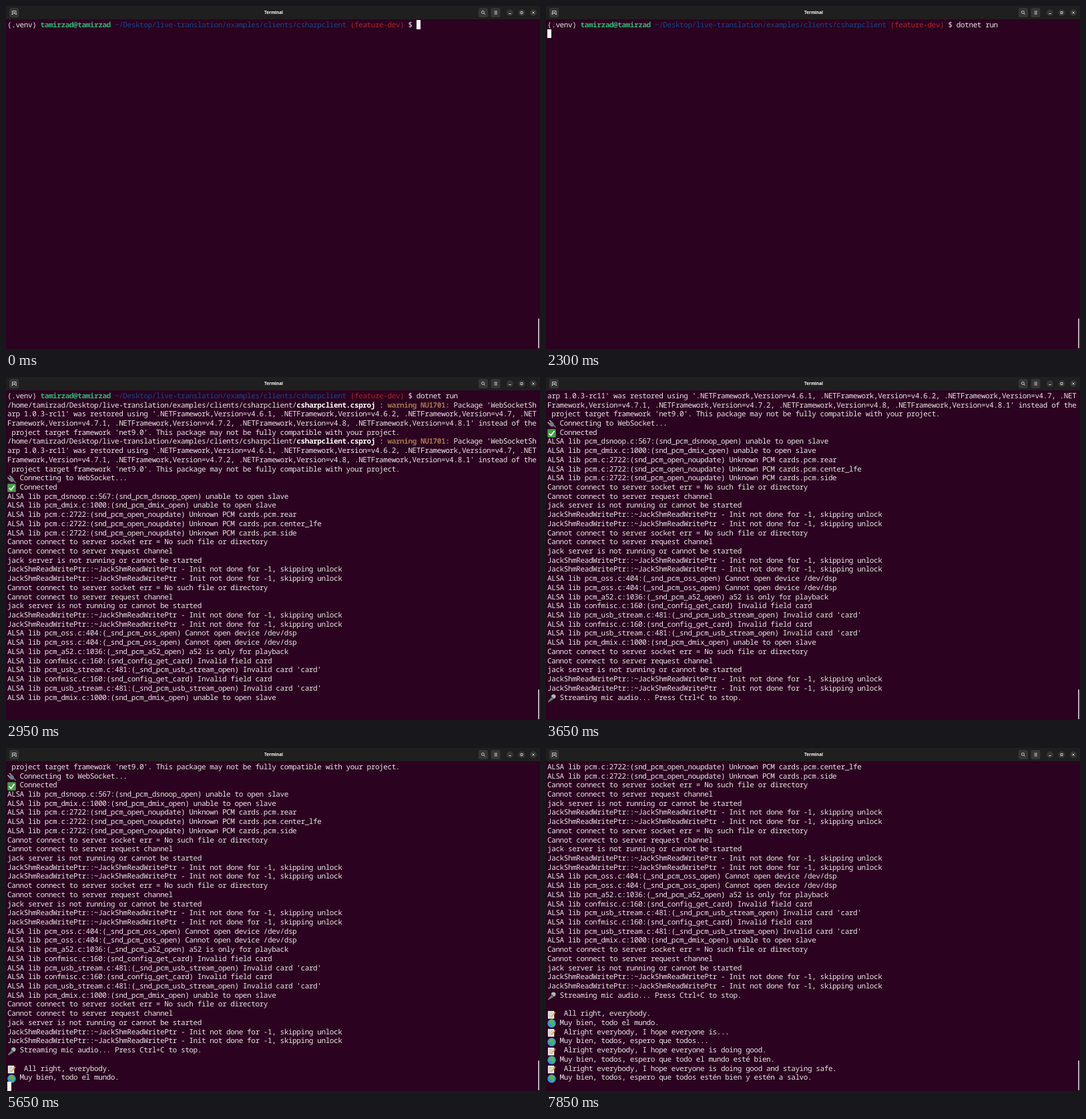
These frames come from a looping animation (800x515 px, 8 s). An HTML page:

```html
<!DOCTYPE html>
<html lang="en">
<head>
<meta charset="utf-8">
<title>Terminal</title>
<style>
  html, body { margin: 0; width: 100%; height: 100%; overflow: hidden; background: #2b021f; }
  #bar { position: absolute; left: 0; top: 0; }
  #screen {
    position: absolute; left: 2px; top: 21.8px;
    font: 11px/13.72px "Noto Sans Mono", "DejaVu Sans Mono", monospace;
    letter-spacing: calc(6.19px - 1ch);
    text-rendering: geometricPrecision;
    white-space: pre; color: #e9e4e7;
  }
  #screen div { height: 13.72px; }
  #screen svg { width: 13px; height: 13px; margin: -2px -.62px -2px 0; vertical-align: -2.5px; }
  #cursor { position: absolute; width: 6.2px; height: 13.7px; background: #fff; }
  #thumb { position: absolute; left: 796.5px; top: 469px; width: 2.5px; height: 45px; border-radius: 2px; background: #b9aeb4; }
  b { color: #fff; }
  .user { color: #2fb673; }
  .path { color: #12488b; }
  .branch { color: #b3242c; }
  .warn { color: #a2734c; }
</style>
</head>
<body>
<svg id="bar" width="800" height="20" fill="none" stroke="#e8e8e8" stroke-width=".8">
  <path d="M0 0H800V20H0z" fill="#1f1f1f" stroke="none"/>
  <g fill="#353535" stroke="none">
    <rect x="5" y="3" width="14" height="14" rx="2.5"/>
    <rect x="708" y="3" width="14" height="14" rx="2.5"/>
    <rect x="726.5" y="3" width="14" height="14" rx="2.5"/>
    <circle cx="755" cy="10" r="5"/><circle cx="772.5" cy="10" r="5"/><circle cx="790" cy="10" r="5"/>
  </g>
  <path d="M9.5 12.5V7.5h5.500v5M8.500 12.500h2M14 12.500h2M12.200 9v3M10.700 10.500h3"/>
  <circle cx="714.4" cy="9.4" r="2"/>
  <path d="M715.9 10.9l1.9 1.9M731.500 8h4.500M731.500 10h4.500M731.500 12h4.500M753.2 11.5h3.6M771 8.5h3v3h-3zM788.4 8.4l3.2 3.2M791.6 8.4l-3.2 3.2"/>
  <text x="401" y="12.3" text-anchor="middle" fill="#fff" stroke="none" font-family="'Open Sans', sans-serif" font-size="6.3" font-weight="700">Terminal</text>
</svg>
<div id="screen"></div>
<div id="cursor"></div>
<div id="thumb"></div>
<script>
const CELL = 6.19, ROW = 13.71, ROWS = 36, LOOP = 8000;

const icon = shapes => `<svg viewBox="0 0 12 12" fill="none">${shapes}</svg>`;
const plug = icon(`<path d="M8 8q2 0 3.500 3" stroke="#6d757a" stroke-width="1.4"/>
  <path d="M1.500 6.500L6 2l3 3.500q1 2-.5 3.500t-3.500 .5z" fill="#737d83"/>
  <path d="M2.500 5.500l-2-2M5 3l-2-2" stroke="#c9cfd2" stroke-width="1.3"/>`);
const check = icon(`<rect x=".2" y=".2" width="11.6" height="11.6" rx="1.2" fill="#43a047"/>
  <path d="M2.5 6.3l2.6 2.6 4.6-6" stroke="#fff" stroke-width="1.7"/>`);
const mic = icon(`<path d="M1 11l5-6 2 2z" fill="#737b80" stroke="#737b80"/>
  <circle cx="8.5" cy="3.5" r="3" fill="#aeb6ba"/><path d="M5.5 4l3 3" stroke="#50575b" stroke-width="1.3"/>`);
const memo = icon(`<path d="M.8 .8h8.7v10.7H.8z" fill="#f1f1ee"/>
  <path d="M2 3h6M2 5h5M2 7h4M2 9h5" stroke="#98a0a5" stroke-width=".7"/>
  <path d="M5.5 9l5-6" stroke="#f5a623" stroke-width="1.8"/><path d="M10.3 3.3l.8-1" stroke="#e0556b" stroke-width="1.8"/>`);
const globe = icon(`<circle cx="6" cy="6" r="5.8" fill="#2e9bd6"/>
  <path d="M3 2l3-1 3 1 1 2-2 1 2 1-1 3-2 2-1-4-3-1-1-2z" fill="#65b04a"/>`);

const user = "tamirzad";
const project = "Desktop/live-translation/examples/clients/csharpclient";
const prompt = `(.venv) <b class="user">${user}@${user}</b> <span class="path">~/${project}</span> <span class="branch">(feature-dev)</span> $ `;
const promptLength = 99;
const command = "dotnet run";
const keyTimes = [1050, 1200, 1300, 1500, 1600, 1700, 1800, 2050, 2100, 2200];
const enterTime = 2250;

const net = v => `.NETFramework,Version=v${v}`;
const warning = [
  `/home/${user}/${project}/<b>csharpclient.csproj</b> : <b class="warn">warning NU1701:</b> Package 'WebSocketSh`,
  `arp 1.0.3-rc11' was restored using '${net("4.6.1")}, ${net("4.6.2")}, ${net("4.7")}, .NET`,
  `Framework,Version=v4.7.1, ${net("4.7.2")}, ${net("4.8")}, ${net("4.8.1")}' instead of the`,
  " project target framework 'net9.0'. This package may not be fully compatible with your project."
];
const alsa = text => "ALSA lib " + text;
const dmix = alsa("pcm_dmix.c:1000:(snd_pcm_dmix_open) unable to open slave");
const unknown = card => alsa(`pcm.c:2722:(snd_pcm_open_noupdate) Unknown PCM cards.pcm.${card}`);
const oss = alsa("pcm_oss.c:404:(_snd_pcm_oss_open) Cannot open device /dev/dsp");
const invalid = [
  alsa("confmisc.c:160:(snd_config_get_card) Invalid field card"),
  alsa("pcm_usb_stream.c:481:(_snd_pcm_usb_stream_open) Invalid card 'card'")
];
const skipped = "JackShmReadWritePtr::~JackShmReadWritePtr - Init not done for -1, skipping unlock";
const jack = [
  "Cannot connect to server socket err = No such file or directory",
  "Cannot connect to server request channel",
  "jack server is not running or cannot be started",
  skipped, skipped
];
const spoken = (heard, translated) => [`${memo}  ${heard}`, `${globe} ${translated}`];

const output = [
  ...warning, ...warning,
  plug + " Connecting to WebSocket...",
  check + " Connected",
  alsa("pcm_dsnoop.c:567:(snd_pcm_dsnoop_open) unable to open slave"),
  dmix, unknown("rear"), unknown("center_lfe"), unknown("side"),
  ...jack, ...jack,
  oss, oss,
  alsa("pcm_a52.c:1036:(_snd_pcm_a52_open) a52 is only for playback"),
  ...invalid, ...invalid,
  dmix, ...jack,
  mic + " Streaming mic audio... Press Ctrl+C to stop.",
  "",
  ...spoken("All right, everybody.", "Muy bien, todo el mundo."),
  ...spoken("Alright everybody, I hope everyone is...", "Muy bien, todos, espero que todos..."),
  ...spoken("Alright everybody, I hope everyone is doing good.", "Muy bien, todos, espero que todo el mundo esté bien."),
  ...spoken("Alright everybody, I hope everyone is doing good and staying safe.", "Muy bien, todos, espero que todos estén bien y estén a salvo.")
];

// [time, output lines printed so far]
const prints = [
  [0, 0], [2450, 4], [2500, 8], [2700, 9], [2750, 10], [2800, 15], [2850, 25], [2900, 33],
  [3000, 40], [3900, 42], [5700, 44], [7100, 46], [7800, 48]
];

const screenBox = document.getElementById("screen");
const cursor = document.getElementById("cursor");
let shown = "";

function cursorOn(t) {
  if (t >= keyTimes[0] && t < 2605) return true;
  const start = t < keyTimes[0] ? -145 : 2605;
  return Math.floor((t - start) / 345) % 2 === 0;
}

function draw(now) {
  const t = now % LOOP;
  const typed = keyTimes.filter(time => time <= t).length;
  const printed = prints.filter(([time]) => time <= t).pop()[1];
  const entered = t >= enterTime;
  const line = entered ? printed + 1 : 0;
  const top = Math.max(0, line + 1 - ROWS);

  const html = [prompt + command.slice(0, typed), ...output.slice(0, printed)]
    .slice(top).map(text => `<div>${text}</div>`).join("");
  if (html !== shown) screenBox.innerHTML = shown = html;

  cursor.style.left = 2 + (entered ? 0 : promptLength + typed) * CELL + "px";
  cursor.style.top = 21 + (line - top) * ROW + "px";
  cursor.style.visibility = cursorOn(t) ? "visible" : "hidden";
}

const start = performance.now();
function tick() {
  draw(performance.now() - start);
  requestAnimationFrame(tick);
}
tick();
</script>
</body>
</html>
```
